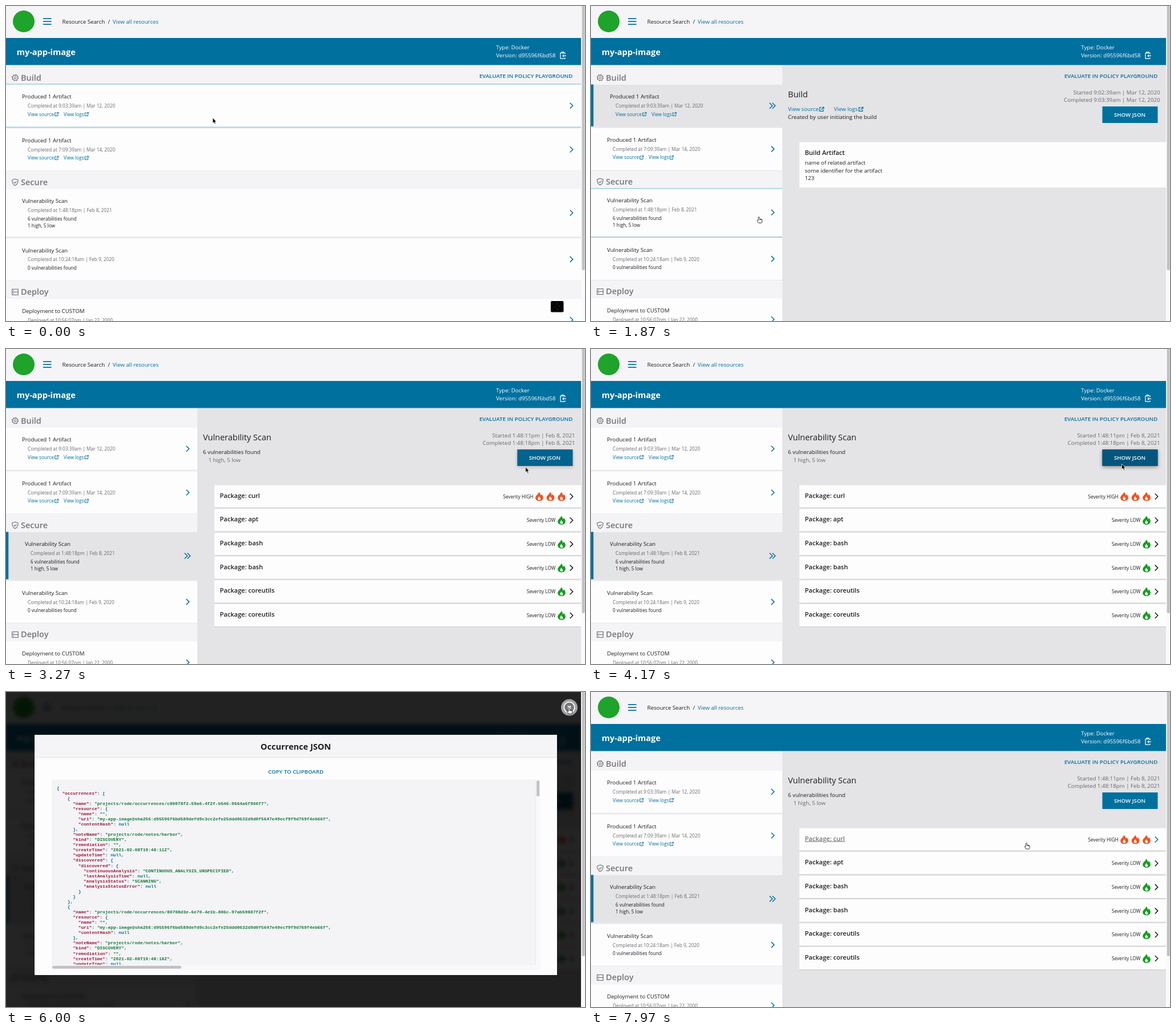
Animation of 1014x552 px, one loop 8000 ms. Source, as an HTML page:

```html
<!DOCTYPE html>
<html lang="en">
<head>
<meta charset="utf-8">
<title>Resource details</title>
<style>
html, body { margin: 0; width: 100%; height: 100%; overflow: hidden; background: #fefdfe; }
svg { display: block; font-family: "Open Sans", sans-serif; }
.b { font-weight: 600; }
.x { font-weight: 700; }
.end { text-anchor: end; }
.mid { text-anchor: middle; }
.code { font: bold 7.85px "Liberation Mono", monospace; }
</style>
</head>
<body>
<svg id="stage" width="1014" height="552" viewBox="0 0 1014 552"></svg>
<script>
const INK = '#1d1d20', GRAY = '#69686c', BLUE = '#00709f', PALE = '#f4f3f6', PANEL = '#e4e3e6', WHITE = '#fefdfe';
const S = 8.25, M = 9.7, L = 14.5;

const text = (x, y, s, size = M, fill = INK, cls = '', extra = '') =>
  `<text x="${x}" y="${y}" font-size="${size}" fill="${fill}" class="${cls}" ${extra}>${s}</text>`;
const rect = (x, y, w, h, fill, extra = '') =>
  `<rect x="${x}" y="${y}" width="${w}" height="${h}" fill="${fill}" ${extra}/>`;
const line = (d, stroke = BLUE, width = 1, extra = '') =>
  `<path d="${d}" fill="none" stroke="${stroke}" stroke-width="${width}" ${extra}/>`;
const circle = (x, y, r, fill, extra = '') => `<circle cx="${x}" cy="${y}" r="${r}" fill="${fill}" ${extra}/>`;
const group = (id, body, extra = '') => `<g id="${id}" ${extra}>${body}</g>`;
const at = (x, y, body) => `<g transform="translate(${x} ${y})">${body}</g>`;

const chevron = (x, y, color = BLUE) => line(`M${x - 2.3} ${y - 5}l5 5-5 5`, color, 1.5);
const link = (x, y, s, iconX, size = S) => text(x, y, s, size, BLUE) +
  at(iconX, y - size * .8, line('M3.2 1.2H.6V6.6H6V4M4.2.6H6.8V3.2M6.6.8 3 4.4', BLUE, 1, `transform="scale(${size / S})"`));

// Left-hand timeline
const rows = [
  { top: 138, h: 73.5, title: 'Produced 1 Artifact', when: 'Completed at 9:03:39am | Mar 12, 2020', links: true },
  { top: 214.7, h: 73.5, title: 'Produced 1 Artifact', when: 'Completed at 7:09:39am | Mar 14, 2020', links: true },
  { top: 321, h: 83, title: 'Vulnerability Scan', when: 'Completed at 1:48:18pm | Feb 8, 2021', notes: ['6 vulnerabilities found', '1 high, 5 low'] },
  { top: 407.4, h: 73, title: 'Vulnerability Scan', when: 'Completed at 10:24:18am | Feb 9, 2020', notes: ['0 vulnerabilities found'] },
  { top: 513.5, h: 73, title: 'Deployment to CUSTOM', when: 'Deployed at 10:56:07pm | Jan 22, 2000' }
];
const icons = {
  gear: circle(0, 0, 4.6, 'none', `stroke="${GRAY}" stroke-width="1.1"`) + circle(0, 0, 1.9, 'none', `stroke="${GRAY}"`) +
    circle(0, 0, 5.3, 'none', `stroke="${GRAY}" stroke-width="1.2" stroke-dasharray="2 2.16"`),
  shield: line('M0-5.8 5.2-4C5.2 1 3.5 4.3 0 5.8-3.5 4.3-5.2 1-5.2-4ZM-2.3-.2-.5 1.6 2.6-1.8', GRAY, 1.1),
  server: line('M-5.2-5H5.2V5H-5.2ZM-5.2 0H5.2M-3.3-2.4h1.4M-3.3 2.6h1.4', GRAY, 1.1)
};
const sections = [['Build', 130.7, 'gear', 0], ['Secure', 313.8, 'shield', 2], ['Deploy', 506.3, 'server', 4]];

function timeline(width, selected) {
  const shift = i => selected >= 0 && i > selected ? -.8 : 0;
  const body = rows.map((r, i) => {
    const on = i === selected, x = on ? 33 : 28, y = r.top;
    return at(0, shift(i),
      rect(0, y, width, r.h, on ? PANEL : WHITE) + (on ? rect(0, y - .5, 4.3, r.h, BLUE) : '') +
      text(x, y + 24.3, r.title) + text(x + 10, y + 40, r.when, S, GRAY) +
      (r.links ? link(x + 10, y + 54.5, 'View source', x + 57) + link(x + 73, y + 54.5, 'View logs', x + 109.5) : '') +
      (r.notes || []).map((s, k) => text(x + 10, y + 54.6 + k * 12.2, s, S)).join('') +
      (on ? chevron(width - 20, y + r.h / 2) + chevron(width - 15, y + r.h / 2) : chevron(width - 17, y + r.h / 2)));
  }).join('');
  const heads = sections.map(([s, y, icon, first]) =>
    at(0, first ? shift(first) : 0, text(26, y, s, L, '#77767a', 'b') + at(16, y - 5, icons[icon]))).join('');
  return rect(0, 104, width, 448, PALE) + rect(0, 211.5, width, 3, '#e9e8eb') + rect(0, 404, width, 3, '#e9e8eb') +
    rect(0, 288, width, 1, '#e9e8eb') + rect(0, 480, width, 1, '#e9e8eb') + body + heads;
}

// Right-hand details
const panel = (title, started, completed, body) => rect(335, 104, 672, 448, PANEL) + text(345, 160, title, L) +
  text(996.5, 154.6, 'Started ' + started, M, GRAY, 'end') + text(996.5, 168, 'Completed ' + completed, M, GRAY, 'end') +
  rect(895.5, 176, 97, 29, BLUE) + body;
const showJson = text(943.5, 193.7, 'SHOW JSON', M, '#fff', 'b mid');

const buildPanel = panel('Build', '9:02:39am | Mar 12, 2020', '9:03:39am | Mar 12, 2020',
  link(345, 184.3, 'View source', 399.7, M) + link(425.5, 184.3, 'View logs', 468.5, M) +
  text(345, 197.6, 'Created by user initiating the build') + showJson +
  rect(365, 238.5, 642, 79.5, WHITE) + text(374.5, 260.5, 'Build Artifact', 11.05, INK, 'b') +
  ['name of related artifact', 'some identifier for the artifact', '123'].map((s, i) => text(374.5, 278.4 + i * 13.3, s)).join(''));

const flame = (x, y, color) => at(x, y,
  `<path d="M-.8-7.8C1.5-6 2.4-4.2 2-2 3-2.4 3.6-3.2 3.8-4.2 6-2 7 0 6.8 2.3 6.4 5.8 3.5 7.6 0 7.6S-6.6 5.8-6.8 2.3C-6.9-.5-4.9-1.8-3.4-3.5-2-5-1.2-6-.8-7.8Z" fill="${color}"/>` +
  `<path d="M-.6-.5C.6.6.5 1.7 1.6 2.2 3 4 2 6.2 0 6.2S-3.2 4.2-2.4 2.4C-1.8 1.3-.7.8-.6-.5Z" fill="#fff"/>`);

const packages = ['curl', 'apt', 'bash', 'bash', 'coreutils', 'coreutils'].map((name, i) => {
  const y = 41.7 * i, high = !i, title = 'Package: ' + name;
  const plain = text(374.5, 260.5, title, 11.05, INK, 'b') + chevron(990, 258.5, INK);
  const hover = text(374.5, 260.5, title, 11.05, '#77767a', 'b', 'text-decoration="underline"') + chevron(990, 258.5);
  return at(0, y, rect(365, 238.5, 642, 39.2, WHITE) + rect(365, 277.7, 642, 1.6, '#d6d5d8') +
    text(high ? 923.5 : 962.5, 261.5, 'Severity ' + (high ? 'HIGH' : 'LOW'), S, INK, 'end') +
    (high ? [934, 953.5, 973] : [973]).map(x => flame(x, 258.6, high ? '#f4511e' : '#149f1f')).join('') +
    (high ? group('curlPlain', plain) + group('curlHover', hover) : plain));
}).join('');

const scanPanel = panel('Vulnerability Scan', '1:48:11pm | Feb 8, 2021', '1:48:18pm | Feb 8, 2021',
  text(345, 184.3, '6 vulnerabilities found') + text(354.5, 197.6, '1 high, 5 low', M, GRAY) +
  group('buttonHover', rect(895.5, 176, 97, 29, '#05567c', 'style="filter:drop-shadow(0 2px 3px #0006)"')) +
  group('buttonFocus', rect(895.5, 176.3, 97, 28.6, 'none', 'stroke="#6cc5e6" stroke-width="1.2"')) +
  showJson + packages);

const header = rect(0, 0, 1007, 56, '#f5f4f7') + circle(31, 27, 19, '#1ea32b') +
  line('M65 22.2h14.5M65 27.2h14.5M65 32.2h14.5', BLUE, 1.8) +
  text(98.5, 30.7, 'Resource Search') + text(178.5, 30.7, '/') + text(186.7, 30.7, 'View all resources', M, BLUE) +
  rect(0, 56, 1007, 47.5, BLUE) + text(18.7, 85.7, 'my-app-image', L, '#fff', 'x') +
  text(858.3, 76, 'Type: Docker', M, '#fff') + text(858.3, 90, 'Version: d95596f6bd58', M, '#fff') +
  line('M979 84V82.3H971V92.2H979V90.5M973.2 82V80.7H976.8V82M981 87.2H975M977.2 85 975 87.2 977.2 89.4', '#fff', 1.2);
const evaluate = text(992.3, 126, 'EVALUATE IN POLICY PLAYGROUND', M, BLUE, 'b end');

// JSON dialog
const occurrence = (id, seconds) => ({
  name: 'projects/rode/occurrences/' + id,
  resource: {
    name: '',
    uri: 'my-app-image@sha256:d95596f6bd589defd9c3cc2efe25ddd0632d9d0f5647e49ecf9f9d769f4eb66f',
    contentHash: null
  },
  noteName: 'projects/rode/notes/harbor', kind: 'DISCOVERY', remediation: '',
  createTime: `2021-02-08T19:48:${seconds}Z`, updateTime: null,
  discovered: { discovered: {
    continuousAnalysis: 'CONTINUOUS_ANALYSIS_UNSPECIFIED', lastAnalysisTime: null,
    analysisStatus: 'SCANNING', analysisStatusError: null
  } }
});
const json = JSON.stringify({ occurrences: [
  occurrence('c80078f2-59a6-4f2f-b546-9664a6f966f7', 11),
  occurrence('80708d3e-6e70-4e1b-806c-97ab59887f2f', 18)
] }, null, 2).split('\n').slice(0, 35).map((row, i) => {
  const s = row.trim().replace(/"[^"]*"(?=(:?))/g, (m, colon) =>
    `<tspan fill='${colon ? '#9b1738' : '#147a3a'}'>${m}</tspan>`);
  return `<text class="code" x="${89 + row.search(/\S/) * 4.71}" y="${170.6 + i * 9.06}" fill="${BLUE}">${s}</text>`;
}).join('');

const modal = rect(0, 0, 1007, 552, '#000', 'opacity=".86"') +
  rect(50, 75, 915, 421, WHITE) + rect(50, 75, 915, 39.5, '#f5f4f7') + rect(50, 114.3, 915, 1, '#dddce0') +
  text(507.5, 101, 'Occurrence JSON', 14.55, INK, 'x mid') + text(507.5, 142.6, 'COPY TO CLIPBOARD', M, BLUE, 'b mid') +
  rect(80, 153.5, 847, 325, PALE) + json +
  rect(80, 478, 856, 9, '#f8f7f9') + rect(927, 153.5, 9, 325, '#f9f8fa') + rect(927, 153.5, .8, 325, '#e6e5e8') +
  rect(929.2, 155, 5, 28, '#c1c0c2', 'rx="2.5"') + rect(81, 479.8, 226, 5, '#c1c0c2', 'rx="2.5"') +
  circle(986.5, 27, 14.5, '#a09fa2') + circle(986.5, 27, 9.3, '#77767a', 'stroke="#fff" stroke-width="1.8"') +
  line('M983.9 24.4l5.2 5.2M989.1 24.4l-5.2 5.2', '#fff', 1.8);

const widget = rect(954, 517, 22.5, 19.5, '#050507', 'rx="2"') +
  [[965, 522, '#2d6a58'], [969, 526, '#2f4f9c'], [962, 528, '#2f4f9c'], [966, 531, '#356']].map(([x, y, c]) => circle(x, y, .7, c)).join('');

stage.innerHTML =
  group('page', header +
    group('wideView', timeline(1007, -1)) +
    group('buildView', buildPanel + timeline(335, 0)) +
    group('scanView', scanPanel + timeline(335, 2)) +
    group('rowHover', '') + evaluate) +
  group('dialog', modal) + group('corner', widget) +
  rect(1007, 0, 7, 552, '#faf9fb') + rect(1008.6, -4, 5, 467, '#c1c0c2', 'rx="2.5"') +
  group('cursor',
    group('arrow', '<path d="M0 0V9.4L2.1 7.5 3.6 10.7 5.2 10 3.8 6.9H6.6Z" fill="#000" stroke="#fff" stroke-width=".7"/>') +
    group('hand', '<path d="M-1 .9Q-.9 0 0 0T1 .9L1.5 3.8Q5.6 3.8 5.8 5.4V7.4Q5.6 9 4.6 10.6H-.5Q-2.4 8.2-3.1 6.3-2.7 5-1 6.2ZM1.5 3.8V5.4M3.1 4V5.6M4.5 4.3V5.7" fill="#fff" stroke="#222" stroke-width=".9"/>'));

// Motion
const OPEN_BUILD = 430, OPEN_SCAN = 1950, OPEN_JSON = 4200, CLOSE_JSON = 6200;
const path = [
  [0, 362, 196], [400, 333, 193], [930, 331, 191.5], [1650, 295, 364], [2000, 293.5, 372], [2600, 293.5, 372],
  [3350, 929.5, 201.5], [4250, 929.5, 201.5], [4900, 655.5, 191.5], [5120, 655.5, 191.5], [5850, 986, 27],
  [6250, 986, 29], [6470, 987, 34.5], [6700, 985, 42], [7390, 762.5, 264.5], [8000, 762.5, 264.5]
];
const ramp = (t, a, b) => Math.min(1, Math.max(0, (t - a) / (b - a)));
const $ = id => document.getElementById(id);
const show = (id, on) => $(id).setAttribute('display', on ? 'inline' : 'none');
const fade = (id, k) => $(id).setAttribute('opacity', k);

function pointer(t) {
  const i = path.findIndex(p => p[0] > t), [t0, x0, y0] = path[i - 1], [t1, x1, y1] = path[i];
  const u = ramp(t, t0, t1), k = u * u * (3 - 2 * u);
  return [x0 + (x1 - x0) * k, y0 + (y1 - y0) * k];
}

function frame(now) {
  const t = now % 8000, [x, y] = pointer(t);
  const selected = t < OPEN_BUILD ? -1 : t < OPEN_SCAN ? 0 : 2;
  const width = selected < 0 ? 1007 : 335;
  const over = x < width && t < 3000 ? rows.findIndex(r => y >= r.top && y < r.top + r.h) : -1;
  const jsonOpen = t >= OPEN_JSON && t < CLOSE_JSON;

  show('wideView', selected < 0);
  show('buildView', selected === 0);
  show('scanView', selected === 2);
  const row = rows[over];
  $('rowHover').innerHTML = row && over !== selected
    ? rect(0, row.top - 2, width, 1.7, '#a9d4de') + rect(0, row.top + row.h, width, 1.9, '#a9d4de') : '';

  fade('buttonHover', ramp(t, 3200, 3350) * (t < CLOSE_JSON));
  show('buttonFocus', t >= CLOSE_JSON && t < 7200);
  show('dialog', jsonOpen);
  $('page').style.filter = jsonOpen ? 'blur(3px)' : 'none';
  show('corner', t < 30);

  const curl = ramp(t, 7760, 7960);
  fade('curlPlain', 1 - curl);
  fade('curlHover', curl);

  const hand = over >= 0 && t > 120 || t > 5800 && t < CLOSE_JSON || t > 7760;
  show('hand', hand);
  show('arrow', !hand);
  $('cursor').setAttribute('transform', `translate(${x} ${y})`);
  requestAnimationFrame(frame);
}
frame(0);
</script>
</body>
</html>
```
